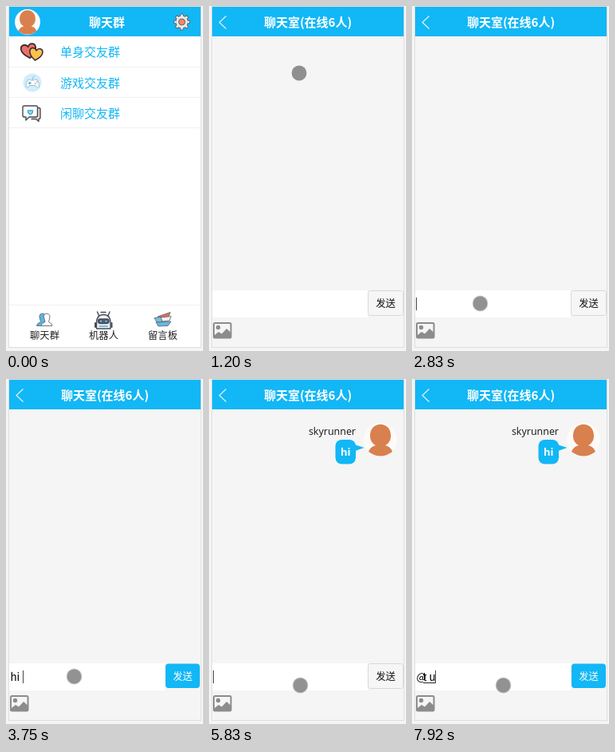
Write an HTML page that moves like this. It is 247 by 432 pixels and loops after 8000 ms.

```html
<!DOCTYPE html>
<html lang="zh-CN">
<head>
<meta charset="utf-8">
<title>聊天群</title>
<style>
html, body { margin: 0; width: 100%; height: 100%; overflow: hidden; background: #f5f5f5; }
svg { display: block; width: 247px; height: 432px; }
text { font-family: "Noto Sans CJK SC", "Noto Sans CJK", "Noto Sans", sans-serif; }
.title { font-size: 15px; font-weight: 700; fill: #fff; text-anchor: middle; }
.row { font-size: 15px; fill: #12b7f5; }
.tab { font-size: 12.3px; fill: #222; text-anchor: middle; }
.send { font-size: 12.3px; text-anchor: middle; }
.name { font: 12.4px "Noto Sans", sans-serif; fill: #222; text-anchor: end; }
.bubble { font: bold 13px "Noto Sans", sans-serif; fill: #fff; text-anchor: middle; }
.typed { font: 13.33px "Liberation Mono", monospace; fill: #000; }
.ink { fill: none; stroke: #444b57; stroke-width: 1.4; stroke-linejoin: round; stroke-linecap: round; }

/* 8 s loop: 1% = 80 ms */
.list, .chat, .msg, .hi, .at, .k1, .k2, .active, .caret, .pointer, .pointer circle {
  animation: 8s step-end infinite;
}
.list { animation-name: list; }
.chat { animation-name: chat; }
.msg { animation-name: msg; }
.hi { animation-name: hi; }
.at { animation-name: at; }
.k1 { animation-name: k1; }
.k2 { animation-name: k2; }
.active { animation-name: active; }
.caret { animation-name: caret; }
.pointer { animation-name: move; }
.pointer circle { animation-name: press; }

@keyframes list { 0% { opacity: 1 } 12.35%, 100% { opacity: 0 } }
@keyframes chat { 0% { opacity: 0 } 12.35%, 100% { opacity: 1 } }
@keyframes msg { 0% { opacity: 0 } 64.08%, 100% { opacity: 1 } }
@keyframes hi { 0%, 63.2%, 100% { opacity: 0 } 46.84% { opacity: 1 } }
@keyframes at { 0% { opacity: 0 } 85.2%, 100% { opacity: 1 } }
@keyframes k1 { 0% { opacity: 0 } 96.1%, 100% { opacity: 1 } }
@keyframes k2 { 0% { opacity: 0 } 98.97%, 100% { opacity: 1 } }
@keyframes active { 0%, 63.2% { opacity: 0 } 46.84%, 85.2%, 100% { opacity: 1 } }
@keyframes caret {
  0%, 29.6%, 42.2% { opacity: 0; transform: translateX(5px) }
  23.84%, 35.35% { opacity: 1; transform: translateX(5px) }
  46.84%, 59.33% { opacity: 1; transform: translateX(21px) }
  52.45% { opacity: 0; transform: translateX(21px) }
  63.2%, 79.47% { opacity: 0; transform: translateX(5px) }
  72.84% { opacity: 1; transform: translateX(5px) }
  85.2% { opacity: 1; transform: translateX(13px) }
  92.1% { opacity: 0; transform: translateX(13px) }
  96.1% { opacity: 1; transform: translateX(21px) }
  98.97%, 100% { opacity: 1; transform: translateX(29px) }
}
@keyframes move {
  0% { opacity: 0; transform: translate(161px, 245px) }
  1.6% { opacity: 1; transform: translate(161px, 245px) }
  2.55% { transform: translate(158px, 222px) }
  3.5% { transform: translate(147px, 185px) }
  4.45% { transform: translate(133px, 150px) }
  5.4% { transform: translate(118px, 118px) }
  6.35% { transform: translate(108px, 92px) }
  7.3% { transform: translate(107px, 75px) }
  8.25% { transform: translate(113px, 65px) }
  9.2% { transform: translate(117.5px, 61.5px) }
  13.27% { transform: translate(116px, 66px) }
  14.2% { transform: translate(113px, 84px) }
  15.13% { transform: translate(108px, 120px) }
  16.07% { transform: translate(103px, 170px) }
  17% { transform: translate(98px, 225px) }
  17.93% { transform: translate(94px, 280px) }
  18.85% { transform: translate(90px, 325px) }
  19.8% { transform: translate(87px, 356px) }
  20.7% { transform: translate(85.5px, 372.5px) }
  52.45% { transform: translate(150px, 377px) }
  53.45% { opacity: 1; transform: translate(208.5px, 381.5px) }
  55.33% { opacity: 0; transform: translate(208.5px, 381.5px) }
  59.33% { opacity: 1; transform: translate(237px, 371px) }
  60.33% { transform: translate(218.5px, 367px) }
  64.08% { transform: translate(214px, 368px) }
  65.05% { transform: translate(203px, 371px) }
  66.03% { transform: translate(187px, 374px) }
  67% { transform: translate(167px, 377px) }
  67.97% { transform: translate(147px, 380px) }
  68.95% { transform: translate(128px, 382px) }
  69.95%, 100% { opacity: 1; transform: translate(114.5px, 383.5px) }
}
@keyframes press {
  0%, 12.35%, 23.84%, 34.34%, 64.08%, 88.34%, 97.1%, 100% { fill: rgba(100, 100, 100, .7) }
  9.2%, 22.84%, 32.47%, 60.33%, 86.2%, 94.2% { fill: rgba(88, 88, 88, .7) }
}
</style>
</head>
<body>
<svg viewBox="0 0 247 432">
  <defs>
    <path id="heart" d="M0 9.5C-5 6-9.500 2-9.500-3C-9.500-9-2.500-10 0-5C2.500-10 9.500-9 9.500-3C9.500 2 5 6 0 9.500Z"/>
    <path id="tooth" d="M-2-7L-1.500-10H1.500L2-7"/>
    <g id="avatar">
      <circle r="21" fill="#fdfaf7"/>
      <path fill="#d9804f" d="M-13-5C-13-24 13-24 13-5C13 1 10 5 6 7Q13 9 15 15Q0 26-15 15Q-13 9-6 7C-10 5-13 1-13-5Z"/>
    </g>
  </defs>

  <rect width="247" height="432" fill="#f5f5f5"/>
  <rect x="3.5" y=".5" width="241" height="427" fill="#f5f5f5" stroke="#dedede"/>

  <g class="list">
    <rect x="4" y="38" width="240" height="389" fill="#fff"/>
    <rect x="4" y="1" width="240" height="37" fill="#12b7f5"/>
    <use href="#avatar" transform="translate(27 20) scale(.76)"/>
    <text class="title" x="126.5" y="25.5">聊天群</text>

    <g transform="translate(220.5 20)" fill="#eceaec" stroke="#5c6470" stroke-width="1">
      <circle r="7.800"/>
      <use href="#tooth"/>
      <use href="#tooth" transform="rotate(45)"/>
      <use href="#tooth" transform="rotate(90)"/>
      <use href="#tooth" transform="rotate(135)"/>
      <use href="#tooth" transform="rotate(180)"/>
      <use href="#tooth" transform="rotate(225)"/>
      <use href="#tooth" transform="rotate(270)"/>
      <use href="#tooth" transform="rotate(315)"/>
      <circle r="4" fill="#ee8a62"/>
    </g>

    <path d="M4 76.5H244M4 114.5H244M4 152.5H244M4 374.5H244" stroke="#f1f1f1"/>

    <g stroke="#3a2a2c" stroke-width="1.800" stroke-linejoin="round">
      <use href="#heart" transform="translate(28.500 56) rotate(-10) scale(.98)" fill="#e8706c"/>
      <use href="#heart" transform="translate(37.500 60) rotate(8) scale(.85)" fill="#fbc04f"/>
    </g>

    <circle cx="33" cy="96" r="11.500" fill="#d3edfa"/>
    <path fill="#fff" stroke="#7fbfe2" stroke-width=".9" d="M27.500 92.500Q30 91 31.500 93H35Q36.500 91 39 92.500Q42 96 41.500 101Q40 104 37 99.500H29.500Q26.500 104 25 101Q24.500 96 27.500 92.500Z"/>
    <path d="M28 96.500h3.500M29.750 94.750v3.500" stroke="#4a90bd"/>
    <path d="M36 97h1.500M38 95h1.500" stroke="#ed8278" stroke-width="1.500"/>
    <path d="M33 92.500q0-4 3-5" fill="none" stroke="#7fbfe2"/>

    <g class="ink">
      <path fill="#f3d5c6" d="M38 127.500h3q2 0 2 2v10q0 2-2 2v3l-3.500-3H32"/>
      <path fill="#fff" d="M23 125h14.500q2 0 2 2v10q0 2-2 2H29l-4 4v-4h-2q-2 0-2-2v-10q0-2 2-2Z"/>
      <path stroke="#3fa9dc" fill="#a9dbf3" d="M27.500 131q2.500-1 3 .5q.5-1.500 3-.5q.5 3.500-3 4.500q-3.500-1-3-4.500Z"/>
    </g>
    <text class="row" x="68" y="63.300">单身交友群</text>
    <text class="row" x="68" y="102.300">游戏交友群</text>
    <text class="row" x="68" y="140.300">闲聊交友群</text>

    <g stroke="#5d6c7a" stroke-width=".9" stroke-linejoin="round">
      <path fill="#5db4dc" d="M38.500 400.500q0-3 4.500-4.500q1-1 0-2.500q-3-8 2.500-8.500q6 .5 3 8.500q-1 1.500 0 2.500q5 1.500 5 4.500Z"/>
      <path fill="#fff" d="M44 400.500q0-3 4.500-4.500q1-1 0-2.500q-3-8 2.500-8.500q6 .5 3 8.500q-1 1.500 0 2.500q4 1.500 4 4.500Z"/>
    </g>
    <g class="ink" stroke-width="1.200">
      <path d="M114.500 383l2.500 6M130 383l-2.500 6M119 383.500h6"/>
      <path fill="#f1f4f6" d="M113.500 404v-7q0-10.500 8.750-10.500q8.750 0 8.750 10.500v7Z"/>
      <rect x="115.500" y="392" width="13.500" height="5.500" rx="2.700" fill="#4e5f70"/>
      <path d="M112 397v5M132.500 397v5" stroke-width="2"/>
      <path d="M119 394.750h.1M125.500 394.750h.1" stroke="#8ed3f2" stroke-width="2"/>
      <path d="M117 401h10.500" stroke="#56a8d4"/>
    </g>
    <g stroke="#596170" stroke-width=".8" stroke-linejoin="round">
      <path fill="#e9695e" d="M190 389l16-5.500-2.500 6.500-12 1Z"/>
      <path fill="#7cc0de" d="M186 390.500l9-1 2 5.500-8 1Z"/>
      <path fill="#eef1f3" d="M194 390l13-1.500-2 5.500-9 1Z"/>
      <path fill="#66b8dc" d="M188 396l19-1-4 5.500-12 .5Z"/>
    </g>
    <text class="tab" x="48.500" y="416.500">聊天群</text>
    <text class="tab" x="122.500" y="416.500">机器人</text>
    <text class="tab" x="196.500" y="416.500">留言板</text>
  </g>

  <g class="chat">
    <rect x="4" y="1" width="240" height="37" fill="#12b7f5"/>
    <path d="M21.500 12.500L13 20.500L21.500 28.500" fill="none" stroke="#d5f1fd" stroke-width="1.300"/>
    <text class="title" x="124" y="25.500">聊天室(在线6人)</text>

    <g class="msg">
      <text class="name" x="184" y="70">skyrunner</text>
      <rect x="158.500" y="76" width="25.500" height="30.500" rx="8" fill="#12b7f5"/>
      <path d="M182 82L194.500 86L182 90.500Z" fill="#12b7f5"/>
      <text class="bubble" x="171.300" y="96">hi</text>
      <use href="#avatar" x="215" y="76"/>
    </g>

    <rect x="4" y="356" width="195" height="34" fill="#fff"/>
    <g class="typed">
      <text class="hi" x="5.500" y="377.500">hi</text>
      <text class="at" x="5.500" y="377.500">@</text>
      <g class="k1"><text x="13.500" y="377.500">t</text><path d="M14 380.500h8" stroke="#222"/></g>
      <g class="k2"><text x="21.500" y="377.500">u</text><path d="M22 380.500h7.500" stroke="#222"/></g>
    </g>
    <rect class="caret" y="365" width="1" height="16" fill="#444"/>

    <rect x="199.500" y="356.500" width="44" height="31" rx="3" fill="#f6f6f6" stroke="#d8d8d8"/>
    <text class="send" x="221.500" y="376.500" fill="#111">发送</text>
    <g class="active">
      <rect x="199" y="356" width="45" height="33" fill="#f5f5f5"/>
      <rect x="200" y="356.500" width="43" height="30.500" rx="4" fill="#12b7f5"/>
      <text class="send" x="221.500" y="376.500" fill="#fff">发送</text>
    </g>

    <rect x="6" y="397" width="21.500" height="18.500" rx="1.500" fill="#f5f5f5" stroke="#8c8c8c" stroke-width="2"/>
    <circle cx="11.500" cy="402.500" r="2.700" fill="#8c8c8c"/>
    <path d="M7 412l5-4 4 2.500 6-6.500 5 4.500v7H7Z" fill="#8c8c8c"/>
  </g>

  <g class="pointer"><circle r="9.400" fill="rgba(100,100,100,.7)"/></g>
</svg>
</body>
</html>
```
